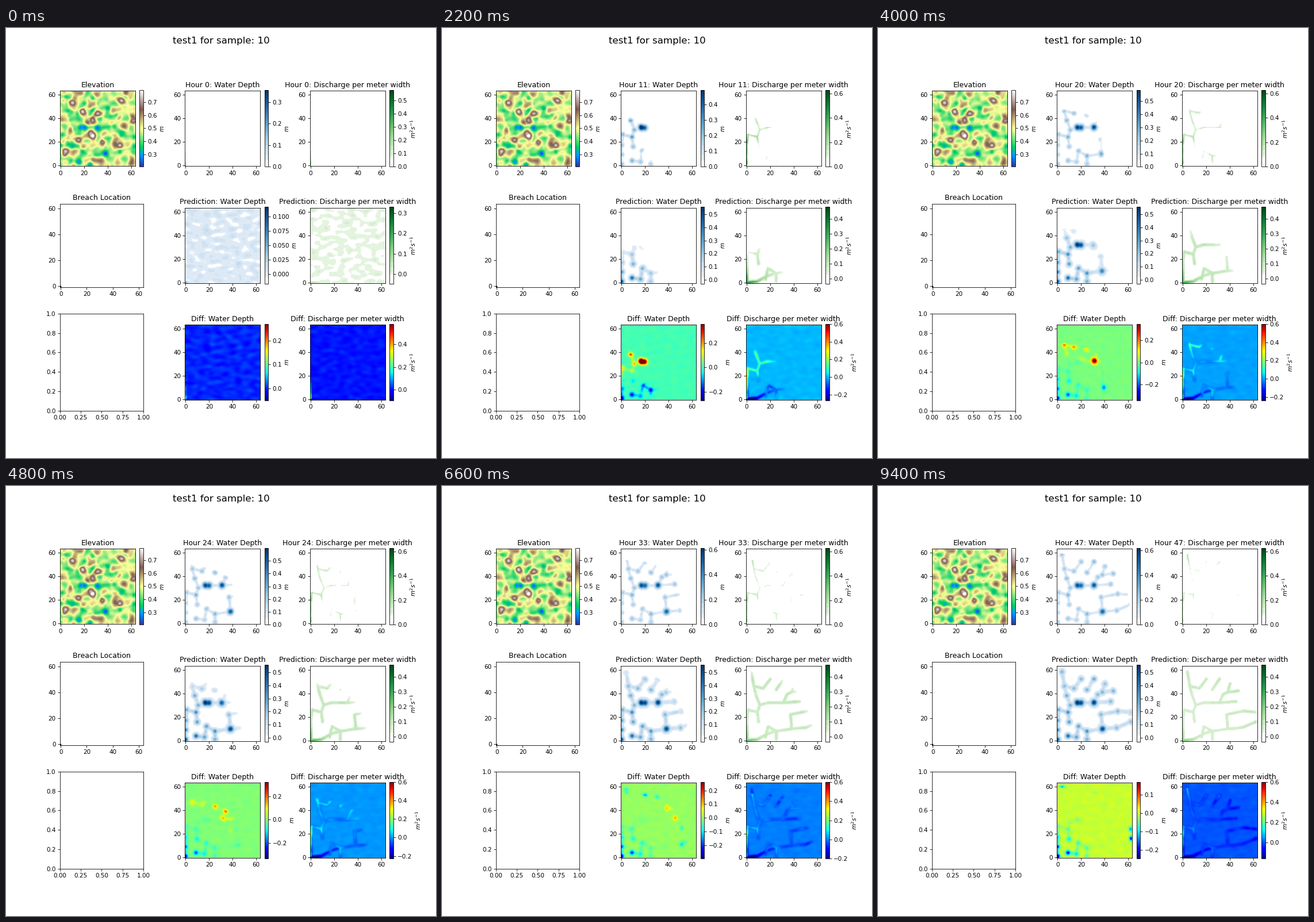
Recreate the animation shown at these times as a matplotlib script. Size 748 by 748 pixels, loop 9.6 s.

```python
import matplotlib.pyplot as plt
import numpy as np
from matplotlib.animation import FuncAnimation
from matplotlib.colors import ListedColormap

N = 64
HOURS = 48
Y, X = np.mgrid[0:N, 0:N].astype(float)

# Channels joining the hollows, from the breach outwards
ROUTES = [
    [(0, 1), (0, 9), (0, 17), (1, 26), (9, 24), (11, 30), (18, 32), (31, 32),
     (45, 33)],
    [(31, 32), (34, 39), (38, 41), (47, 42)],
    [(38, 41), (40, 48)],
    [(16, 3), (18, 12), (25, 8), (38, 10), (50, 11), (62, 16)],
    [(9, 24), (10, 16)],
    [(25, 8), (25, 1)],
    [(38, 10), (37, 22), (51, 25), (62, 24)],
    [(11, 30), (8, 38), (6, 46), (4, 58)],
    [(6, 46), (14, 44), (20, 52)],
    [(25, 43), (31, 52)],
]
POND = [(9, 4), (16, 3)]
DEEP = [(17, 32), (20, 32), (31, 32), (38, 10)]
HILLS = [(3, 9), (4, 12), (32, 4), (46, 18), (50, 17), (25, 28), (27, 25),
         (22, 36), (27, 38), (32, 43), (25, 49), (10, 53), (12, 57), (52, 55),
         (55, 61), (61, 37), (60, 42), (35, 20), (8, 30), (15, 21), (18, 46),
         (60, 5)]


def bumps(points, width):
    """Round bumps of height one, joined by their maximum."""
    return np.max([np.exp(-((X - x) ** 2 + (Y - y) ** 2) / (2 * width ** 2))
                   for x, y in points], axis=0)


def along(route):
    """Points about one cell apart on a polyline."""
    pts = np.array(route, float)
    dist = np.r_[0, np.cumsum(np.hypot(*np.diff(pts, axis=0).T))]
    d = np.arange(0, dist[-1] + 1)
    return list(zip(np.interp(d, dist, pts[:, 0]), np.interp(d, dist, pts[:, 1])))


def channels(routes, width):
    return bumps([p for route in routes for p in along(route)], width)


def smooth_noise(seed, sx, sy):
    rng = np.random.default_rng(seed)
    kx, ky = np.fft.fftfreq(N)[None, :], np.fft.fftfreq(N)[:, None]
    k2 = (kx * sx) ** 2 + (ky * sy) ** 2
    band = np.exp(-2 * np.pi ** 2 * k2) - np.exp(-8 * np.pi ** 2 * k2)
    f = np.fft.ifft2(np.fft.fft2(rng.normal(size=(N, N))) * band).real
    return f / f.std()


def pale_steps(name, cut):
    """Sequential map with flat steps at the pale end and white below cut."""
    t = np.linspace(0, 1, 256)
    colors = plt.get_cmap(name)(np.where(t < 0.3, np.round(t * 16) / 16, t))
    colors[t < cut] = 1
    return ListedColormap(colors)


# Terrain: hills on a plain, drained by the hollows
rough = smooth_noise(4, 2, 2)
pools = bumps(POND + [p for route in ROUTES for p in route], 1.5)
basin = np.maximum.reduce([.12 * channels(ROUTES + [POND], 1), .25 * pools,
                           .55 * bumps(DEEP, 1.9)]) * (1 + .1 * rough)
elevation = .48 + .2 * bumps(HILLS, 2) - .45 * basin + .05 * rough

breach = np.zeros((N, N))
breach[0, 0] = 1

# Hour at which the water reaches each cell
sill = 8 * np.exp(-((X - 21) / 5) ** 2 - ((Y - 9) / 5) ** 2)
reach = (np.minimum(Y, 26) / 9 - 2 + np.minimum(X, 2) + X ** 2 / 85
         + np.maximum(Y - 30, 0) ** 2 / 20 + sill)
reach_hat = (X ** 2 / 100 + Y ** 2 / 120 - 1
             + 5 * np.exp(-X / 10) * np.minimum(Y / 8, 1))

# Final state of each quantity; the prediction overfills near the breach
R2 = X ** 2 + Y ** 2
basin_hat = basin * (1 + 1.1 * np.exp(-R2 / 400))
stream = (channels(ROUTES, .7) * (1 + .2 * rough)
          * (.23 * np.exp(-X / 45) + .32 * np.exp(-X)))
stream_hat = (channels(ROUTES + [[(0, 0), (9, 1), (18, 6), (25, 8)]], .9)
              * (.14 + .3 * np.exp(-R2 / 120)))
ripples = [smooth_noise(seed, 2.2, 1.3) for seed in (11, 12, 13, 14)]


def filled(arrival, hour, rise):
    return np.clip((hour - arrival) / rise, 0, 1)


def fading(arrival, hour, span):
    return np.exp(-np.maximum(hour - arrival, 0) / span)


def ripple(hour, a, b):
    return a * np.cos(hour / 4) + b * np.sin(hour / 4)


def fields(hour):
    wet, wet_hat = filled(reach, hour, 4), filled(reach_hat, hour, 8)
    depth = basin * wet
    flux = stream * wet * fading(reach, hour, 50)
    depth_hat = (basin_hat * wet_hat
                 + (.003 + .002 * np.exp(-hour / 10)) * ripple(hour, *ripples[:2]))
    flux_hat = (stream_hat * wet_hat * fading(reach_hat, hour, 60)
                + (.003 + .004 * np.exp(-hour / 8)) * ripple(hour, *ripples[2:]))
    return {(0, 1): depth, (0, 2): flux, (1, 1): depth_hat, (1, 2): flux_hat,
            (2, 1): depth - depth_hat, (2, 2): flux - flux_hat}


def limits(hour):
    """Colour range of each panel as the flood develops."""
    start = np.exp(-hour / 2)
    dip = np.exp(-((hour - 5) / 2) ** 2)
    return {
        (0, 1): (0, max(.354, .617 - .6 * np.exp(-hour / 7))),
        (0, 2): (0, min(.579 + .02 * hour, .627)),
        (1, 1): (-.03 - .073 * dip + .013 * start, min(.117 + .044 * hour, .555)),
        (1, 2): (-.035 - .032 * dip - .011 * start, min(.329 + .037 * hour, .48)),
        (2, 1): (max(-.052 - .02 * hour, -.42 + .0037 * hour),
                 min(.27 + .008 * hour, .48 - .0066 * hour)),
        (2, 2): (max(-.098 - .017 * hour, -.3 + .003 * hour),
                 min(.582 + .006 * hour, .603)),
    }


fig, axes = plt.subplots(3, 3, figsize=(10, 10), dpi=74.8)
fig.subplots_adjust(left=.1257, right=.9007, bottom=.1095, top=.8795,
                    wspace=.5, hspace=.2)
fig.suptitle("test1 for sample: 10", fontsize=16)


def panel(ax, data, cmap, title, unit, vmin, vmax):
    im = ax.imshow(data, cmap=cmap, origin="lower", vmin=vmin, vmax=vmax)
    ax.set_title(title)
    fig.colorbar(im, ax=ax, fraction=.046, pad=.05, label=unit)
    return im


panel(axes[0, 0], elevation, "terrain", "Elevation", "$m$", .203, .794)
axes[1, 0].imshow(breach, cmap="binary", origin="lower")
axes[1, 0].set_title("Breach Location")

QUANTITIES = ["Water Depth", "Discharge per meter width"]
UNITS = ["$m$", "$m^2s^{-1}$"]
SEQUENTIAL = [pale_steps("Blues", .075), pale_steps("Greens", .12)]
PREFIXES = ["Hour 0", "Prediction", "Diff"]

images = {}
for (row, col), (low, high) in limits(0).items():
    k = col - 1
    cmap = "jet" if row == 2 else SEQUENTIAL[k]
    images[row, col] = panel(axes[row, col], np.zeros((N, N)), cmap,
                             f"{PREFIXES[row]}: {QUANTITIES[k]}", UNITS[k],
                             low, high)


def update(hour):
    ranges = limits(hour)
    for key, data in fields(hour).items():
        images[key].set_data(data)
        images[key].set_clim(*ranges[key])
    for k, name in enumerate(QUANTITIES):
        axes[0, k + 1].set_title(f"Hour {hour}: {name}")
    return list(images.values())


anim = FuncAnimation(fig, update, frames=HOURS, interval=200,
                     init_func=lambda: update(0), repeat=True, repeat_delay=0)
plt.show()
```
